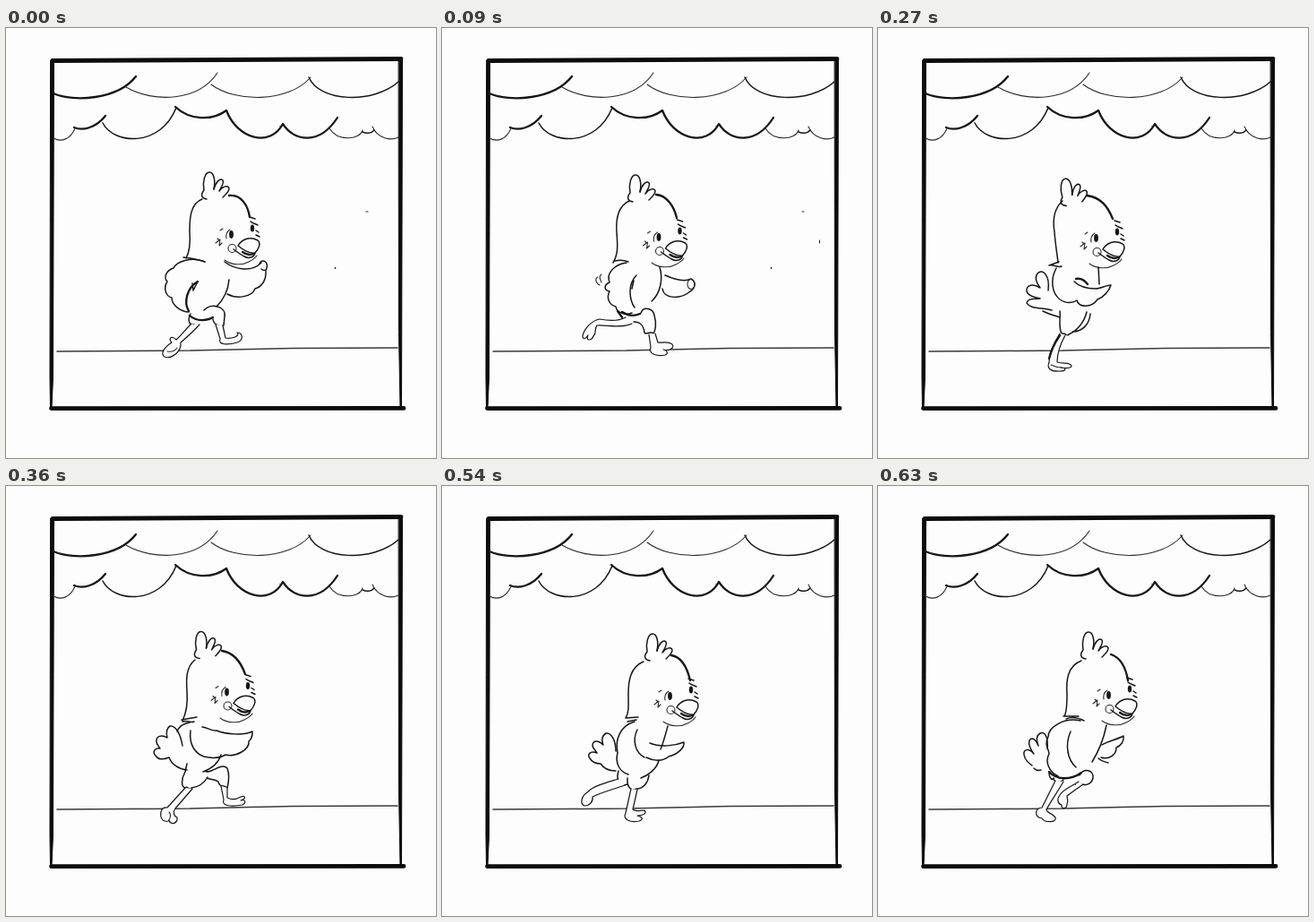
An HTML page for the animation above (0.72 s loop, 480 by 480 pixels).

```html
<!DOCTYPE html>
<html lang="en">
<head>
<meta charset="utf-8">
<title>Running chick on stage</title>
<style>
html, body { margin: 0; width: 100%; height: 100%; overflow: hidden; background: #fdfdfd; }
svg { display: block; width: 100%; height: 100%; }
.ink { fill: none; stroke: #161616; stroke-width: 1.5; stroke-linecap: round; stroke-linejoin: round; }
.b { stroke-width: 2.3; }
.t { stroke-width: 1.1; stroke: #2a2a2a; }
.foot { fill: #fdfdfd; stroke-width: 1.2; }
.dot { fill: #161616; stroke: none; }
.pose { visibility: hidden; animation: show 720ms step-end infinite; animation-delay: calc((var(--i) - 8) * 90ms); }
@keyframes show {
  0% { visibility: visible; }
  12.5%, 100% { visibility: hidden; }
}
</style>
</head>
<body>
<svg viewBox="0 0 480 480">
<defs>
  <filter id="rough" filterUnits="userSpaceOnUse" x="0" y="0" width="480" height="480" color-interpolation-filters="sRGB">
    <feTurbulence type="fractalNoise" baseFrequency=".45" numOctaves="2" seed="4"/>
    <feDisplacementMap in="SourceGraphic" scale="1.3" xChannelSelector="R" yChannelSelector="G"/>
  </filter>
  <g id="face">
    <ellipse class="dot" cx="251.500" cy="230.500" rx="2.4" ry="4.4"/>
    <path class="t" d="M246 235C245 230 247 227 250 225M239 226L242 224M234 240L239 236L238 243L241 240M236 235L238 237"/>
    <ellipse class="dot" cx="275" cy="223.500" rx="2.2" ry="4"/>
    <path d="M272 211L278 213M273 216C275 218 279 219 281 220M279 226L282 228M279 231L283 233"/>
    <path d="M259 243C263 236 272 232 281 237C285 240 282 247 278 251C272 252 265 248 259 243"/>
    <path class="b" d="M264 250C268 253 272 254 276 252"/>
    <path d="M254 247C258 250 262 253 266 255C271 258 277 256 278 251"/>
    <circle class="t" cx="252.500" cy="246" r="4.5"/>
  </g>
  <g id="crest">
    <path d="M224 191C218 190 217 186 221 181C219 172 222 161 227 161C232 161 234 170 232 180"/>
    <path d="M232 180C234 172 239 167 242 170C244 173 240 178 238 182C241 177 248 175 249 179C249 183 245 186 242 189"/>
  </g>
  <path id="jaw" class="t" d="M244 259C252 265 264 265 271 261C275 259 278 257 280 254"/>
</defs>

<g class="ink" filter="url(#rough)">
  <path stroke-width="4.8" stroke="#0c0c0c" d="M52 36.500L441 34.500M50.500 424.600L444 424.400"/>
  <path stroke="#0c0c0c" stroke-width="1" fill="#0c0c0c" d="M50 36H53.500L52.500 390L51 424H49.500L49 390ZM438.500 35H442.500L441.500 423H440L438.500 340Z"/>
  <path stroke-width="1.5" stroke="#3a3a3a" d="M57 361L213 360M206 360L320 357.500L437 357"/>
  <path class="b" d="M53 73C75 83 125 80 145 54M76 111C85 115 100 112 111 98M189 88C205 103 230 104 246 92C258 124 295 134 309 107C322 127 350 131 370 100"/>
  <path d="M108 106C120 130 172 134 190 89M338 55C350 83 410 85 438 60M398 116C402 118 408 118 411 114"/>
  <path class="t" d="M134 66C165 84 215 82 236 50M229 63C255 83 315 84 340 55M53 123C62 128 72 124 77 112M361 112C370 127 395 125 398 114M409 110C415 124 430 126 438 122"/>

  <g class="pose" style="--i:0">
    <use href="#crest"/><use href="#face"/><use href="#jaw"/>
    <path d="M219 191C206 196 205 212 205 226C206 240 205 250 201 257M198 256C205 257 214 258 222 261"/>
    <path class="b" d="M249 187C262 185 270 198 272 211"/>
    <path d="M222 261C208 255 191 260 187 268C178 271 176 279 180 283C175 291 179 300 185 301C185 310 196 317 204 317M249 281C248 293 243 303 235 311"/>
    <path class="b" d="M214 283C202 290 198 306 204 316"/>
    <path d="M209 293L208 285M209 293L214 283M244 261C256 270 274 273 285 262M283 263C286 257 293 261 291 268C291 271 287 271 285 269M290 270C291 282 285 289 278 291C275 300 258 303 247 297"/>
    <path d="M221 315C229 306 246 311 244 322L243 332C238 334 232 331 231 325M206 319C202 326 205 333 210 331"/>
    <path class="b" d="M205 321C213 328 224 327 231 323"/>
    <path class="foot" d="M206 331C200 337 194 345 190 348C184 342 181 348 185 351C176 357 172 364 177 367C184 370 196 362 195 351C201 346 208 340 216 331"/>
    <path class="t" d="M180 361C185 362 189 360 191 357"/>
    <path class="foot" d="M234 331L239 347C236 354 248 354 258 351C266 348 264 340 258 340C262 345 250 347 245 346L242 332"/>
    <circle class="dot" cx="367.500" cy="268" r=".9"/><path class="t" d="M402 205H404"/>
  </g>

  <g class="pose" style="--i:1">
    <use href="#crest" x="-11" y="3"/><use href="#face" x="-9.500" y="3"/><use href="#jaw" x="-10" y="3"/>
    <path d="M209 193C196 199 194 214 195 228C196 242 197 252 191 262M193 260C198 259 203 259 208 261"/>
    <path class="b" d="M239 186C251 187 259 199 262 212"/>
    <path d="M206 262C192 264 183 274 187 284C180 287 181 293 187 294C183 302 187 309 194 311C195 318 205 321 212 318M243 267C247 280 244 296 234 305"/>
    <path class="t" d="M178 275C174 277 177 281 178 284M174 278C170 280 172 285 176 287"/>
    <path d="M217 276C207 286 209 303 215 312M212 291L214 282M249 276C258 280 270 284 278 280C284 283 283 291 277 294C268 302 248 304 246 291"/>
    <ellipse cx="278" cy="286" rx="4" ry="5.500" class="t"/>
    <path d="M222 318C225 310 236 313 237 321C240 330 238 338 236 341C232 338 228 343 226 340C225 332 222 328 214 328"/>
    <path class="b" d="M201 317C207 321 214 322 221 319M196 316L201 323"/>
    <path class="foot" d="M205 323C196 328 186 327 176 325C168 326 158 336 157 344C157 348 161 347 163 343C160 350 167 349 169 344C173 340 170 335 173 332C182 331 200 336 212 330"/>
    <path class="foot" d="M231 342L233 356C230 364 240 367 249 365C254 363 250 359 247 359C254 361 260 357 257 353C251 349 245 352 241 351L238 341"/>
    <circle class="dot" cx="367.500" cy="268" r=".9"/><path class="t" d="M402 205H404M421.500 237V240"/>
  </g>

  <g class="pose" style="--i:2">
    <use href="#crest" transform="translate(-13 5) rotate(-5 234 190)"/><use href="#face" x="-9" y="4"/><use href="#jaw" x="-9" y="4"/>
    <path d="M207 193C195 200 194 215 196 228C197 242 199 252 196 262M191 264L203 261"/>
    <path class="b" d="M236 187C250 188 257 199 262 212"/>
    <path d="M190 293C191 277 183 270 177 276C174 280 177 286 180 290C170 284 163 290 168 296C165 302 171 308 178 306C182 313 192 315 200 316"/>
    <path d="M201 266C191 277 190 295 199 303C206 309 216 308 220 304M246 268L247 281M222 281C235 290 252 290 268 284C271 290 262 299 250 302C242 309 228 310 221 304"/>
    <path d="M200 316C200 328 206 338 213 341C224 338 231 330 234 315"/>
    <path class="foot" d="M202 324C186 329 172 332 160 340C153 344 152 352 157 355C163 355 167 350 166 345C174 340 190 337 205 333"/>
    <path class="foot" d="M212 341L210 362C206 370 216 373 226 371C232 369 228 366 223 365C231 366 236 362 232 359C227 358 222 360 218 358L219 339"/>
  </g>

  <g class="pose" style="--i:3">
    <use href="#crest" transform="translate(-14 6) rotate(-8 234 190)"/><use href="#face" x="-8" y="4"/><use href="#jaw" x="-8" y="4"/>
    <path d="M206 193C196 202 195 216 197 228C198 242 200 252 201 262M202 261L191 265C197 264 201 268 205 266"/>
    <path class="b" d="M233 187C248 189 256 198 262 213"/>
    <path d="M190 293C192 276 184 268 178 274C174 279 178 286 181 290C170 283 163 290 167 296C170 300 177 301 181 302C176 303 167 301 166 307C170 314 184 312 194 315"/>
    <path d="M199 268C192 281 194 296 203 303C210 308 218 307 222 304C224 312 238 313 245 303C251 301 258 294 260 287C255 287 248 291 243 291C235 291 225 289 219 283M246 267L247 286"/>
    <path class="b" d="M221 280C226 279 231 282 234 286"/>
    <path d="M184 316C190 319 197 321 203 323M203 316C204 324 201 334 205 341C210 340 211 345 213 342C222 338 230 329 233 317M217 339C229 339 236 330 237 319"/>
    <path class="foot" d="M203 341C196 352 191 362 191 373C188 380 193 384 203 383C211 383 210 379 204 379C209 380 216 380 216 377C214 373 208 375 200 373C200 362 204 352 209 343"/>
    <path class="b" d="M203 343C197 352 193 360 191 369"/>
    <path class="t" d="M193 376C197 378 201 379 205 379"/>
  </g>

  <g class="pose" style="--i:4">
    <use href="#crest" transform="translate(-8 1) rotate(-3 234 190)"/><use href="#face" x="-5" y="-.5"/><use href="#jaw" x="-5"/>
    <path d="M211 194C201 202 201 215 202 229C203 243 201 254 197 262M196 261L213 258M197 263C202 261 206 265 210 263"/>
    <path class="b" d="M241 184C254 186 262 196 267 210"/>
    <path d="M205 264C198 265 193 269 191 274M197 290C195 278 190 267 183 268C178 271 179 277 180 281C174 277 167 279 168 286C169 290 171 291 172 293C166 292 163 297 167 301C170 306 177 305 182 303C185 311 193 316 202 317"/>
    <path d="M206 273C204 290 212 299 221 302C233 305 240 303 245 300C257 303 272 294 271 285C275 282 275 278 275 274C265 279 245 277 235 273M219 269C226 270 230 274 235 273"/>
    <path d="M240 300C237 310 228 316 220 319M202 310L200 319C196 326 195 336 200 337C203 334 204 341 207 337C215 336 221 332 225 325M222 318C227 323 240 308 247 315C250 323 248 333 247 337C242 332 239 338 237 330C233 327 229 328 224 326"/>
    <path class="foot" d="M200 337L180 359C172 358 171 368 175 373C179 375 181 375 182 373C184 380 192 376 191 370C187 368 186 364 189 360L208 338"/>
    <path class="t" d="M182 373C184 369 184 366 182 364"/>
    <path class="foot" d="M240 335L243 350C240 358 253 358 264 356C269 353 267 350 262 351C268 349 268 345 262 347C257 350 251 350 247 348L247 337"/>
  </g>

  <g class="pose" style="--i:5">
    <use href="#crest" x="6" y="3"/><use href="#face" y="5"/><use href="#jaw" y="4"/>
    <path d="M221 196C207 203 205 218 205 232C205 245 205 253 201 259M201 259L214 258M203 262C207 260 211 264 215 261"/>
    <path class="b" d="M252 189C264 190 271 202 274 216"/>
    <path d="M198 295C196 284 191 275 183 275C177 277 177 283 179 287C173 283 166 283 167 290C168 294 170 295 171 297C165 296 162 301 166 305C171 309 177 308 181 307C185 314 192 317 200 317"/>
    <path d="M210 264C197 273 199 296 215 301M252 269L246 290M226 271C221 280 230 290 244 291C252 292 260 290 264 291C268 296 262 298 257 299C251 302 247 299 242 298M218 306C228 312 244 312 253 305"/>
    <path d="M240 311C236 318 228 322 222 326M197 320C192 328 192 335 197 335C203 336 215 335 222 326M219 328C214 338 219 342 222 339C225 345 233 342 231 326"/>
    <path class="foot" d="M195 328C180 324 166 326 160 338C158 345 161 350 165 351C171 351 170 343 167 338C166 333 175 331 195 334"/>
    <path class="t" d="M162 340C164 343 165 346 165 350"/>
    <path class="foot" d="M223 342L224 362C223 370 235 370 244 367C250 365 244 362 240 362C248 361 251 357 246 355C240 355 235 358 231 357L229 342"/>
  </g>

  <g class="pose" style="--i:6">
    <use href="#crest" x="8" y="4"/><use href="#face" x="3" y="4"/><use href="#jaw" x="3" y="4"/>
    <path d="M225 196C210 202 208 218 208 232C208 244 209 253 205 259M205 259L219 258M207 263L217 261"/>
    <path class="b" d="M256 189C268 191 274 204 277 217"/>
    <path d="M194 296C194 284 189 275 183 276C178 279 178 285 180 289C174 283 168 284 168 290C169 294 172 296 173 298C165 295 162 300 165 304C168 309 173 310 177 310C181 316 188 318 194 318"/>
    <path d="M215 263C198 268 193 284 196 298C193 309 198 319 208 322M218 272C212 284 216 298 226 303M252 268C249 279 247 287 244 294M232 287C244 292 260 290 270 286C271 292 264 299 253 302C246 308 236 307 228 303"/>
    <path d="M242 306C240 316 230 323 222 326M197 318C194 328 198 336 207 333M207 326C206 337 212 341 217 338C225 338 230 331 231 323"/>
    <path class="foot" d="M197 327C184 331 170 334 162 342C155 347 154 355 159 357C165 357 169 352 168 347C178 342 190 339 204 334"/>
    <path class="foot" d="M211 338L205 365C201 373 211 376 220 374C226 372 223 369 218 368C225 368 229 365 226 362C221 362 216 364 213 361L218 339"/>
  </g>

  <g class="pose" style="--i:7">
    <use href="#crest" x="8" y="2"/><use href="#face" x="6" y="3"/><use href="#jaw" x="6" y="3"/>
    <path d="M227 195C211 201 210 218 211 232C211 243 211 252 208 257M207 257L224 257M210 260C217 257 224 259 230 262"/>
    <path class="b" d="M260 188C272 192 277 205 279 217"/>
    <path d="M189 293C190 282 187 273 181 276C176 279 177 285 179 290C177 284 172 279 169 284C167 290 172 296 174 299C168 292 162 294 163 300C164 306 168 309 172 312M174 315C176 317 179 318 182 317"/>
    <path d="M226 262C208 258 190 269 190 280C185 289 191 294 191 299C186 308 191 319 201 324M215 274C208 290 212 306 221 314M255 267C252 282 247 295 239 308"/>
    <path d="M250 289C256 285 267 283 274 279C275 285 271 290 266 292C266 300 258 306 249 303M246 304C250 308 254 308 257 309"/>
    <path class="b" d="M191 319C200 329 216 328 227 320"/>
    <path d="M225 323C230 314 241 317 240 326C238 334 230 335 225 332M191 319C191 327 195 329 196 326C197 333 204 331 207 328"/>
    <path class="foot" d="M224 330C215 336 206 339 203 345C199 350 201 355 205 356C204 361 211 361 211 355C213 351 211 349 211 346C216 342 222 338 229 333"/>
    <path class="foot" d="M198 329L183 359C174 360 175 370 183 371C186 376 200 376 198 370C193 364 188 365 188 361C193 352 200 342 207 330"/>
  </g>
</g>
</svg>
</body>
</html>
```
